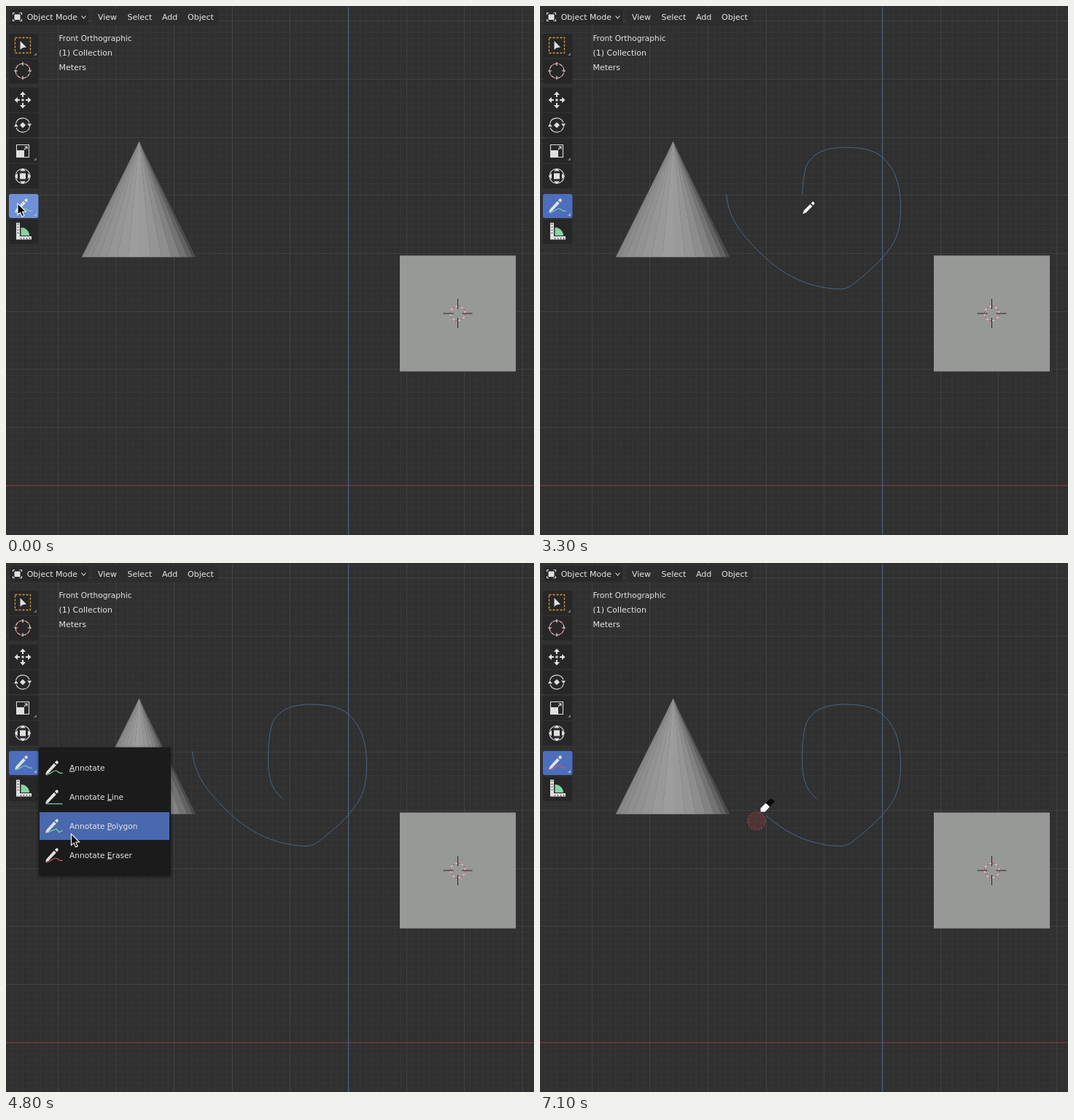
These frames come from a looping animation (724x726 px, 7200 ms). An HTML page:

```html
<!DOCTYPE html>
<html lang="en">
<head>
<meta charset="utf-8">
<title>Annotate tools</title>
<style>
  html, body { margin: 0; width: 100%; height: 100%; overflow: hidden; background: #303030; }
  svg { display: block; width: 724px; height: 726px; }
  text { font: 11px "DejaVu Sans", sans-serif; fill: #e6e6e6; white-space: pre; }
  .small { font-size: 10.6px; }
  .key { text-decoration: underline; }
  .line { fill: none; stroke: #dcdcdc; stroke-width: 1.1; }
  .fill { fill: #e0e0e0; }
  .green { fill: none; stroke: #7fd6a4; stroke-width: 1.2; }
  .red { fill: none; stroke: #c9605e; stroke-width: 1.2; }
  .grid { shape-rendering: crispEdges; }
  #menu { filter: drop-shadow(0 1px 2px #0008); }
</style>
</head>
<body>
<svg viewBox="0 0 724 726" xmlns="http://www.w3.org/2000/svg">
  <defs>
    <g id="pen" class="fill">
      <path d="M-11 9.500L-9.500 5.200 .8 -6.200 3.800 -3.300-7 8Z"/>
      <path d="M1.900 -7.300L3.600 -9.200Q4.800 -10.300 6 -9.200T6.600 -6.500L4.900 -4.500Z"/>
    </g>
    <path id="free" d="M-10 10C-4 9-1 4 3 4S7 9 13 7"/>
    <path id="straight" d="M-10 9.500H12.500"/>
    <path id="poly" d="M-10 9.500L4 4 8 8.500 12.500 6"/>
    <path id="head" d="M0 -11L4 -7H-4Z"/>
    <path id="corner" fill="#777" d="M42 0V-4L38 0Z"/>
    <g id="ring" fill="none" stroke-width="1.100">
      <circle r="10" stroke="#e4dedc"/>
      <circle r="10" stroke="#b04440" stroke-dasharray="3.93"/>
    </g>
  </defs>

  <rect width="724" height="726" fill="#303030"/>
  <g class="grid">
    <path id="minor" stroke="#353535"/>
    <path id="major" stroke="#404040"/>
  </g>
  <g stroke-width="1.600">
    <path d="M0 658.300H724" stroke="#74363d"/>
    <path d="M469.500 2V726" stroke="#435a72"/>
  </g>

  <g id="cone"></g>
  <rect x="540" y="342.500" width="159" height="159" fill="#979997"/>
  <g transform="translate(619.500 422)">
    <use href="#ring"/>
    <path d="M-20 0H-6M6 0H20M0 -20V-6M0 6V20" stroke="#222"/>
  </g>
  <path id="stroke" transform="translate(.5 .5)" fill="none" stroke="#4a6c92" stroke-width=".9"/>

  <rect x="5" y="4" width="108" height="22" rx="4" fill="#292929"/>
  <rect x="119" y="4" width="172" height="22" rx="4" fill="#2d2d2d"/>
  <path class="line" d="M9.500 12V9.500H12M18.500 9.500H21.500V12M21.500 18V20.500H18.500M12 20.500H9.500V18"/>
  <rect class="fill" x="11.500" y="11.500" width="8" height="7.500"/>
  <path class="line" d="M103.500 13.500L106.500 17 109.500 13.500"/>
  <text x="28.700" y="19">Object Mode</text>
  <text x="126" y="19">View</text>
  <text x="166.500" y="19">Select</text>
  <text x="214" y="19">Add</text>
  <text x="249" y="19">Object</text>
  <text class="small" x="72.500" y="48">Front Orthographic</text>
  <text x="72.500" y="68">(1) Collection</text>
  <text x="72.500" y="88">Meters</text>

  <g id="buttons" fill="#272727"></g>
  <rect id="active" x="4" y="258" width="40.500" height="33" rx="3"/>

  <rect x="12.500" y="43.500" width="21" height="21" fill="none" stroke="#d99d3e" stroke-width="1.300" stroke-dasharray="3 2"/>
  <path class="fill" d="M19.500 48V60L22.500 57.500 28 56.500Z"/>
  <use href="#corner" y="68"/>
  <g transform="translate(23 89)">
    <use href="#ring"/>
    <path class="line" d="M-12 0H-7M7 0H12M0 -12V-7M0 7V12"/>
  </g>
  <g id="move" class="fill" transform="translate(23 129)">
    <rect x="-1.500" y="-1.500" width="3" height="3"/>
  </g>
  <g transform="translate(23 163.500)">
    <path class="fill" d="M0 -4L4 0 0 4-4 0Z"/>
    <path class="line" d="M-9.500 -2A9.700 9.700 0 0 1 9 -3.500M9.500 2A9.700 9.700 0 0 1-9 3.500"/>
    <path class="fill" d="M6 -2H12L9.500 2ZM-6 2H-12L-9.500 -2Z"/>
  </g>
  <path class="line" d="M14.500 198V190.500H31.500V207.500H25M25 197L29 193M25.500 193H29V196.500"/>
  <rect class="fill" x="14" y="198" width="11" height="10"/>
  <use href="#corner" y="212"/>
  <g id="transform" class="fill" transform="translate(23 233.500)">
    <circle class="line" r="10"/>
    <rect x="-4" y="-4" width="8" height="8"/>
  </g>
  <g transform="translate(23 274)">
    <use href="#pen"/>
    <use id="wave" href="#free"/>
  </g>
  <path d="M42 288V284L38 288Z" fill="#9db4e4"/>
  <path class="fill" d="M14 297.500H19V316H35V320.500H14Z"/>
  <path d="M16.500 299V315" stroke="#555" stroke-width="2.500" stroke-dasharray="1 3"/>
  <path d="M20 319H34" stroke="#555" stroke-width="2.500" stroke-dasharray="1 3"/>
  <path d="M20.500 304A11.500 11 0 0 1 32 315H20.500Z" fill="#86d3a5"/>

  <g id="menu">
    <rect x="45" y="253" width="181" height="176.500" rx="3" fill="#1b1b1b"/>
    <rect id="choice" x="46" width="178" height="38" fill="#4a68ad"/>
  </g>

  <circle id="halo" r="12.300" fill="#ff5a50" fill-opacity=".15" stroke="#a8443f" stroke-dasharray="3 2"/>
  <path id="arrow" d="M0 0V15.500L3.600 12.300 6 18 8.800 16.800 6.400 11.200H11.200Z" fill="#080808" stroke="#fff" stroke-width="1.100"/>
  <g id="pencil" fill="#fff" stroke="#222" stroke-width=".5">
    <path d="M0 0L1.500 -5 10.500 -14 13.700 -11 4.700 -1.800Z"/>
    <path d="M11.500 -15L13.300 -17Q14.500 -18 15.700 -17T16.400 -14L14.700 -12Z"/>
  </g>
  <g id="eraser">
    <path d="M6.500 -11.500L12 -16.500Q14 -17.700 16 -16.500L18 -14.500Q18.500 -13 17.500 -12L12 -6.500Z" fill="#080808"/>
    <path d="M-.5 .5V-4.500L6.500 -11.500 12 -6.500 5.500 .5Z" fill="#fff"/>
  </g>
</svg>

<script>
const $ = id => document.getElementById(id);
const clamp = (v, lo, hi) => Math.max(lo, Math.min(hi, v));
const create = tag => document.createElementNS('http://www.w3.org/2000/svg', tag);
const make = (parent, tag, attrs, html = '') => {
  const el = create(tag);
  for (const k in attrs) el.setAttribute(k, attrs[k]);
  el.innerHTML = html;
  return parent.appendChild(el);
};

// Viewport grid, ten small cells to each large one
const cell = 7.965, lines = { minor: '', major: '' };
for (let k = -85; k < 40; k++) {
  const x = Math.floor(469.5 + k * cell) + .5, y = Math.floor(658.1 + k * cell) + .5;
  lines[k % 10 ? 'minor' : 'major'] += `M${x} 0V726M0 ${y}H724`;
}
for (const id in lines) $(id).setAttribute('d', lines[id]);

// Cone facets: brightening to the middle, then falling off into shadow
const rim = i => 183 - 79 * Math.cos(Math.PI * i / 16);
for (let i = 0; i < 16; i++) {
  const s = i < 8 ? 132 + 3.5 * i : 156 - 1.65 * (i - 7) ** 2;
  const color = `rgb(${s},${s},${s})`;
  make($('cone'), 'path', {
    d: `M183 186L${rim(i)} 344.500H${rim(i + 1)}Z`, fill: color, stroke: color, 'stroke-width': .3
  });
}

for (const [top, count] of [[38, 2], [112, 4], [258, 2]])
  for (let i = 0; i < count; i++)
    make($('buttons'), 'rect', { x: 4, y: top + i * 35, width: 40.5, height: 33.5, rx: 3 });

for (const a of [0, 90, 180, 270]) {
  make($('move'), 'path', { d: 'M0 -11.500L4 -7H1V-4H-1V-7H-4Z', transform: `rotate(${a})` });
  make($('transform'), 'use', { href: '#head', transform: `rotate(${a})` });
}

const items = [
  ['free', 'green', '<tspan class="key">A</tspan>nnotate'],
  ['straight', 'green', 'Annotate <tspan class="key">L</tspan>ine'],
  ['poly', 'green', 'Annotate <tspan class="key">P</tspan>olygon'],
  ['free', 'red', 'Annotate <tspan class="key">E</tspan>raser']
];
items.forEach(([shape, tint, label], i) => {
  const y = 281 + i * 40;
  make($('menu'), 'g', { transform: `translate(65 ${y})` },
    `<use href="#pen"/><use href="#${shape}" class="${tint}"/>`);
  make($('menu'), 'text', { x: 87, y: y + 3.5, class: 'small' }, label);
});

// A pointer move follows a path between two times, slowing down a little
function move(start, end, d) {
  const path = create('path');
  path.setAttribute('d', d);
  const length = path.getTotalLength();
  const travel = t => length * (1 - (1 - clamp((t - start) / (end - start), 0, 1)) ** 1.25);
  return { start, d, length, travel, at: t => path.getPointAtLength(travel(t)) };
}

const draw = move(1700, 3500, `M255 258C258 288 272 306 285 321S320 358 345 371S395 388 413 388
  C424 387 430 380 438 374C455 360 474 343 485 323C493 308 494 290 494 278C494 245 487 224 469 207
  C455 195 435 193.500 413 193.500C388 195 372 202 364 221C360 235 359 255 359 268C359 300 366 312 379 323`);
const moves = [
  move(0, 400, 'M16 271Q46 245 24 266'),
  move(500, 1000, 'M24 266C110 225 110 345 22 272'),
  move(1100, 1500, 'M22 272Q150 300 246 261'),
  draw,
  move(3600, 4100, 'M379 323Q240 265 41 279'),
  move(4200, 5000, 'M41 279Q78 335 97 393'),
  move(5000, 5100, 'M97 393L114 398'),
  move(5200, 5900, 'M114 398C200 490 260 400 258 260'),
  move(5900, 7000, 'M258 260Q264 300 297 354'),
  move(7000, 7100, 'M297 354L303 341')
];
const pointer = t => moves.filter(m => m.start <= t).pop().at(t);

const stroke = $('stroke');
stroke.setAttribute('d', draw.d);

const show = (el, on) => { el.style.display = on ? '' : 'none'; };
const place = (el, { x, y }) => el.setAttribute('transform', `translate(${x} ${y})`);

const step = 100;
function render(t) {
  const pos = pointer(t), { x, y } = pos;
  const menu = t >= 4500 && t < 5000, erasing = t >= 5100;
  const tool = erasing ? 'eraser' : x > 56 && t < 4200 ? 'pencil' : 'arrow';
  for (const id of ['arrow', 'pencil', 'eraser']) {
    show($(id), id === tool);
    place($(id), pos);
  }

  // Ink and eraser halo trail the pointer by one step
  const inked = draw.travel(t - step);
  const wiped = t > 5900 ? 12 + 94 * (t - 5900) / 1200 : 0;
  stroke.setAttribute('stroke-dasharray', `0 ${wiped} ${Math.max(0, inked - wiped)} ${draw.length}`);
  show(stroke, inked > 0);
  show($('halo'), t >= 6000);
  if (t >= 6000) place($('halo'), pointer(t - step));

  const hover = !menu && x <= 44 && y >= 258 && y <= 291;
  $('active').setAttribute('fill', hover ? '#6f90d6' : '#4d6ebd');
  $('wave').setAttribute('class', erasing ? 'red' : 'green');

  show($('menu'), menu);
  $('choice').setAttribute('y', 262 + 40 * clamp(Math.floor((y - 261) / 40), 0, 3));
}

const origin = performance.now();
function tick() {
  const t = (performance.now() - origin) % 7200;
  render(Math.floor(t / step) * step);
  requestAnimationFrame(tick);
}
tick();
</script>
</body>
</html>
```
